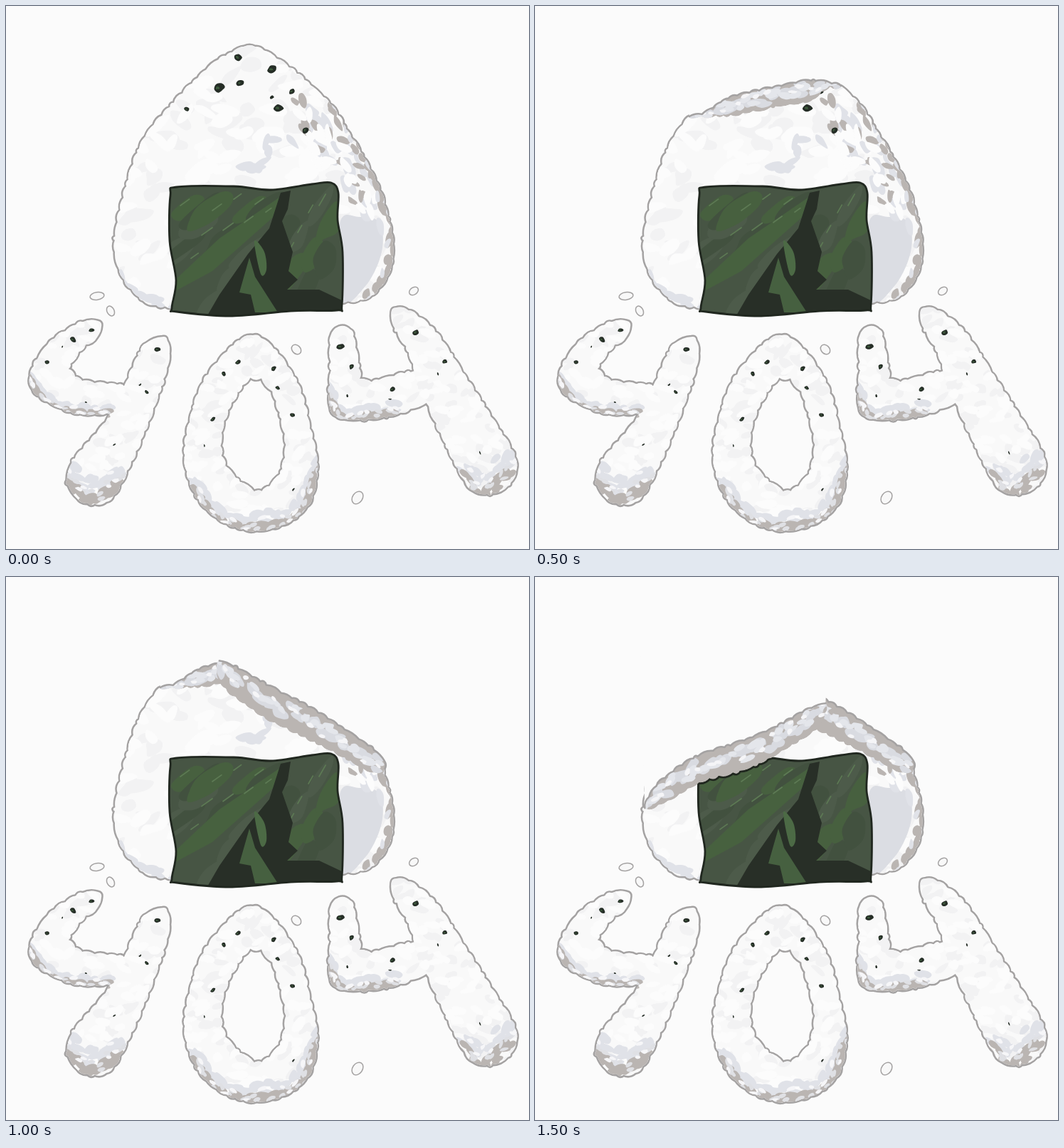
These frames come from a looping animation (735 px wide and 762 px high, 2 s). An HTML page:

```html
<!DOCTYPE html>
<html lang="en">
<head>
<meta charset="utf-8">
<title>404</title>
<style>
  html, body { margin: 0; width: 100%; height: 100%; overflow: hidden; background: #fbfbfb; }
  svg { display: block; width: 735px; height: 762px; }
  .bite { opacity: 0; animation: 2s step-end infinite; }
  #bite1 { animation-name: first; }
  #bite2 { animation-name: second; }
  #bite3 { animation-name: third; }
  @keyframes first { 0% { opacity: 0 } 25%, 100% { opacity: 1 } }
  @keyframes second { 0% { opacity: 0 } 50%, 100% { opacity: 1 } }
  @keyframes third { 0% { opacity: 0 } 75%, 100% { opacity: 1 } }
</style>
</head>
<body>
<svg viewBox="0 0 735 762" fill="none" stroke-linejoin="round" stroke-linecap="round">
  <g id="ball"></g>
  <g id="bite1" class="bite"></g>
  <g id="bite2" class="bite"></g>
  <g id="nori"></g>
  <g id="bite3" class="bite"></g>
  <g id="digits"></g>
</svg>
<script>
const NS = 'http://www.w3.org/2000/svg';
const PAPER = '#fbfbfb', WHITE = '#fcfcfc', PALE = '#f2f2f3', BLUE = '#e0e2e8', TAUPE = '#bab5b2', LINE = '#a4a2a2';
const INK = '#20271f', SPECK = '#252d26';
const $ = id => document.getElementById(id);

function add(parent, tag, attrs) {
  const e = document.createElementNS(NS, tag);
  for (const k in attrs) e.setAttribute(k, attrs[k]);
  return parent.appendChild(e);
}
const fill = (g, d, color) => add(g, 'path', { d, fill: color });
const line = (g, d, color, w) => add(g, 'path', { d, stroke: color, 'stroke-width': w });

let clips = 0;
function clipped(parent, shapes) {
  const id = 'clip' + ++clips, clip = add(parent, 'clipPath', { id });
  for (const d of shapes) add(clip, 'path', { d, 'clip-rule': 'evenodd' });
  return add(parent, 'g', { 'clip-path': `url(#${id})` });
}

let seed = 404;
function rnd(a, b) {
  seed = seed * 16807 % 2147483647;
  return a + (b - a) * seed / 2147483647;
}

const points = s => s.trim().split(/\s+/).map(p => p.split(',').map(Number));
const poly = s => 'M' + s + 'Z';

// Catmull-Rom spline through the points
function smooth(p, closed = true) {
  const n = p.length;
  const at = i => closed ? p[(i + n) % n] : p[Math.max(0, Math.min(n - 1, i))];
  let d = `M${p[0][0]},${p[0][1]}`;
  for (let i = 0; i < (closed ? n : n - 1); i++) {
    const [a, b, c, e] = [at(i - 1), at(i), at(i + 1), at(i + 2)];
    const near = [0, 1].map(k => b[k] + (c[k] - a[k]) / 6);
    const far = [0, 1].map(k => c[k] - (e[k] - b[k]) / 6);
    d += `C${near} ${far} ${c[0]},${c[1]}`;
  }
  return d + (closed ? 'Z' : '');
}

const probe = document.createElementNS(NS, 'path');

// Turns a curve into a chain of rounded rice bumps on its left side
function scallop(d, step = 16, bulge = 2.2) {
  probe.setAttribute('d', d);
  const len = probe.getTotalLength(), n = Math.round(len / step);
  const stop = i => probe.getPointAtLength(len * (i + (i % n ? rnd(-.36, .36) : 0)) / n);
  let a = stop(0), out = `M${a.x},${a.y}`;
  for (let i = 1; i <= n; i++) {
    const b = stop(i), dx = b.x - a.x, dy = b.y - a.y;
    const k = 2 * bulge * rnd(.6, 1.3) / (Math.hypot(dx, dy) || 1);
    out += `Q${(a.x + b.x) / 2 + dy * k},${(a.y + b.y) / 2 - dx * k} ${b.x},${b.y}`;
    a = b;
  }
  return out;
}

// Left and right border of a centre line given as x, y, radius
function sides(p, closed) {
  const n = p.length, left = [], right = [];
  p.forEach(([x, y, r], i) => {
    const a = p[closed ? (i + n - 1) % n : Math.max(0, i - 1)];
    const b = p[closed ? (i + 1) % n : Math.min(n - 1, i + 1)];
    const dx = b[0] - a[0], dy = b[1] - a[1], k = Math.max(1, r - 2) / Math.hypot(dx, dy);
    left.push([x + dy * k, y - dx * k]);
    right.unshift([x - dy * k, y + dx * k]);
  });
  return { left, right };
}

// Half circle from the end of one border to the start of the other
function cap(a, b) {
  const x = (a[0] + b[0]) / 2, y = (a[1] + b[1]) / 2;
  const r = Math.hypot(a[0] - x, a[1] - y), t = Math.atan2(a[1] - y, a[0] - x);
  return [1, 2, 3].map(i => [x + r * Math.cos(t + i * Math.PI / 4), y + r * Math.sin(t + i * Math.PI / 4)]);
}

function limb(p) {
  const { left, right } = sides(p);
  return scallop(smooth([...left, ...cap(left.at(-1), right[0]), ...right, ...cap(right.at(-1), left[0])]));
}

function ring(p) {
  const { left, right } = sides(p, true);
  return scallop(smooth(left)) + scallop(smooth(right));
}

function blob(x, y, rx, ry, turn) {
  const c = Math.cos(turn), s = Math.sin(turn), p = [];
  for (let i = 0; i < 7; i++) {
    const t = i * Math.PI * 2 / 7, k = rnd(.78, 1.2);
    const u = Math.cos(t) * rx * k, v = Math.sin(t) * ry * k;
    p.push([x + u * c - v * s, y + u * s + v * c]);
  }
  return smooth(p);
}

function scatter(g, box, n, size, color) {
  let d = '';
  while (n-- > 0)
    d += blob(box.x + rnd(0, box.width), box.y + rnd(0, box.height), size * rnd(.7, 1.4), size * rnd(.4, .7), rnd(-1, .8));
  fill(g, d, color);
}

// Grains lying along a line
function strew(g, p, n, spread, size, color, lift = 0) {
  probe.setAttribute('d', smooth(p, false));
  const len = probe.getTotalLength();
  let d = '';
  for (let i = 0; i < n; i++) {
    const at = len * (i + rnd(.1, .9)) / n;
    const a = probe.getPointAtLength(at - 3), b = probe.getPointAtLength(at);
    const turn = Math.atan2(b.y - a.y, b.x - a.x) + rnd(-.5, .5);
    d += blob(b.x + rnd(-spread, spread), b.y - lift + rnd(-spread, spread), size * rnd(.8, 1.3), size * rnd(.4, .65), turn);
  }
  fill(g, d, color);
}

function rice(parent, shapes, size) {
  const rim = add(parent, 'g', {});
  shapes.forEach(d => line(rim, d, LINE, 5));
  const box = rim.getBBox(), g = clipped(parent, shapes);
  add(g, 'rect', { x: box.x, y: box.y, width: box.width, height: box.height, fill: '#f9f9f9' });
  const n = Math.round(box.width * box.height / (size * size * 5));
  scatter(g, box, n, size, PALE);
  scatter(g, box, n, size, WHITE);
  return g;
}

// Blue shadow turning to brown at the border, with light grains on top
function shade(g, way, depth) {
  const p = points(way);
  let n = 0;
  p.forEach((q, i) => { if (i) n += Math.hypot(q[0] - p[i - 1][0], q[1] - p[i - 1][1]) / 9; });
  strew(g, p, n * 1.6, depth, 10, BLUE, depth * 1.7);
  strew(g, p, n * 2, depth * .7, 9, TAUPE);
  strew(g, p, n * .9, depth * .7, 5, '#dfe0e4', depth * .5);
  strew(g, p, n * .5, depth, 5, '#f6f6f8', depth);
}

function specks(g, list) {
  for (const [x, y, r] of points(list)) {
    const turn = rnd(-.9, .9);
    fill(g, blob(x, y, r, r * .75, turn), SPECK);
    if (r > 3) fill(g, blob(x - r * .2, y, r * .4, r * .25, turn), '#3d5a3c');
  }
}

// Rice ball
const body = scallop(smooth(points(`309,70 345,56 390,81 451,133 482,180 504,216 528,268 544,345 523,397
  470,415 236,422 179,400 153,345 165,270 192,190 233,139 286,85`)));
const ball = rice($('ball'), [body], 15);
strew(ball, points('158,375 185,405 235,420'), 9, 7, 11, BLUE);
strew(ball, points('325,225 365,222 372,185 405,195'), 9, 6, 11, BLUE);
fill(ball, smooth(points('469,305 496,296 525,304 528,345 506,392 469,416')), '#dbdde3');
const flank = points('420,140 450,195 490,235 518,290'), border = points('455,135 505,215 532,275 543,345 510,410');
strew(ball, flank, 22, 20, 12, BLUE);
strew(ball, flank, 22, 22, 8, TAUPE);
strew(ball, flank, 20, 22, 10, WHITE);
strew(ball, border, 36, 5, 9, TAUPE);
strew(ball, border, 12, 8, 7, BLUE);
specks(ball, '326,72,6 374,89,7 329,108,5 299,115,8 402,120,4.5 374,128,3 383,143,6.5 254,145,3.5 421,174,5');

// Seaweed
const leaf = smooth(points(`231,266 240,254 320,253 372,258 430,250 457,248 467,262 466,300 473,345 472,420
  465,427 400,428 318,435 240,429 233,424 239,385 230,330`));
const nori = clipped($('nori'), [leaf]);
fill(nori, leaf, '#475544');
const slant = x => x < 370 ? -.62 : -1.05;
for (let i = 0; i < 24; i++) {
  const x = 240 + i * 9.5;
  fill(nori, blob(x, rnd(260, 420), rnd(25, 45), rnd(8, 16), slant(x)), ['#4d5b4a', '#42513f', '#47603f'][i % 3]);
}
fill(nori, poly('238,384 300,326 385,268 378,294 290,372 238,400'), '#47613f');
for (let i = 0; i < 14; i++) {
  const x = 245 + i * 15, y = rnd(270, 385), r = rnd(9, 20), t = slant(x);
  line(nori, `M${x},${y}l${r * Math.cos(t)},${r * Math.sin(t)}`, '#5d7a54', 1.7);
}
fill(nori, poly('386,262 400,259 396,285 388,302 403,345 397,372 410,384 395,398 440,398 474,414 474,432 282,436 300,405 340,348 370,312'), '#282f27');
fill(nori, poly('328,402 342,353 350,380 382,430 350,430 344,405'), '#466040');
fill(nori, smooth(points('349,330 363,345 366,370 358,376')), '#4c6a45');
line($('nori'), leaf, INK, 2.8);

// Hides what is eaten and shows the broken edge
function bite(g, centre) {
  const p = points(centre), { left, right } = sides(p);
  const top = scallop(smooth(left, false)), under = scallop(smooth(right, false), 16, 2.5);
  const rim = top + under.replace('M', 'L') + 'Z';
  fill(g, `${top}L${p.at(-1)[0] + 10},0L${p[0][0] - 10},0Z`, PAPER);
  line(clipped(g, [leaf]), under, INK, 5);
  const inner = clipped(g, [rim]);
  fill(inner, rim, TAUPE);
  const n = (p.at(-1)[0] - p[0][0]) / 9;
  strew(inner, p, n, 8, 10, '#d9dbe1', 3);
  strew(inner, p, n, 8, 8, '#e4e6eb', 3);
  strew(inner, p, n / 2, 8, 5, '#f5f5f7', 3);
  line(g, top, LINE, 2.5);
}
bite($('bite1'), '217,156,1 240,152,4 275,141,14 330,129,15 385,119,16 408,111,6 430,113,1');
bite($('bite2'), '299,118,1 312,138,17 367,175,22 412,198,22 469,230,19 520,262,15 532,270,2');
bite($('bite3'), '155,325,2 178,304,15 230,270,19 294,250,21 352,222,18 390,198,16 409,178,1');

// Digits
function digit(shapes, paths, shades, dots) {
  const g = rice($('digits'), shapes, 10);
  shades.forEach(([way, depth]) => shade(g, way, depth));
  paths.forEach(p => strew(g, p, 2, 7, 2, SPECK));
  specks(g, dots);
}
const four = (hook, stem, shades, dots) => {
  const paths = [hook, stem].map(points);
  digit(paths.map(limb), paths, shades, dots);
};
four('121,453,16 98,466,18 70,494,23 60,520,31 100,548,25 158,551,21',
  '213,481,20 205,502,24 172,583,28 123,662,39',
  [['28,518 60,559 105,572 142,570', 4], ['82,664 118,692 160,668', 11]],
  '120,455,3.8 94,468,4.5 58,500,3.2 213,482,4 198,542,3.2');

const loop = points(`347,491,31 388,528,20 410,600,20 413,650,26 396,690,31 352,709,29
  306,688,32 278,640,28 283,580,25 306,528,26`);
digit([ring(loop)], [loop],
  [['262,680 300,722 355,734 415,712 436,655', 8]],
  '326,500,3.8 306,516,3.6 376,509,3.8 382,536,3.2 403,574,3.8 291,580,3.6');

four('472,465,18 476,505,21 480,552,31 525,551,28 585,534,25',
  '554,437,17 584,470,25 625,550,35 678,646,41',
  [['453,545 475,578 545,571', 5], ['640,660 668,683 712,650', 11]],
  '470,478,5 486,506,3.8 543,538,4 576,458,5 617,499,3.6');

// Loose grains
for (const [x, y, rx, ry, turn] of points('128,407,10,5.3,-8 147,428,5,7.3,-28 408,482,5.8,7.5,-45 573,400,7,5,-35 494,690,7,9.5,35'))
  add($('digits'), 'ellipse', { cx: x, cy: y, rx, ry, transform: `rotate(${turn} ${x} ${y})`, fill: '#f8f8f8', stroke: LINE, 'stroke-width': 1.5 });
</script>
</body>
</html>
```
